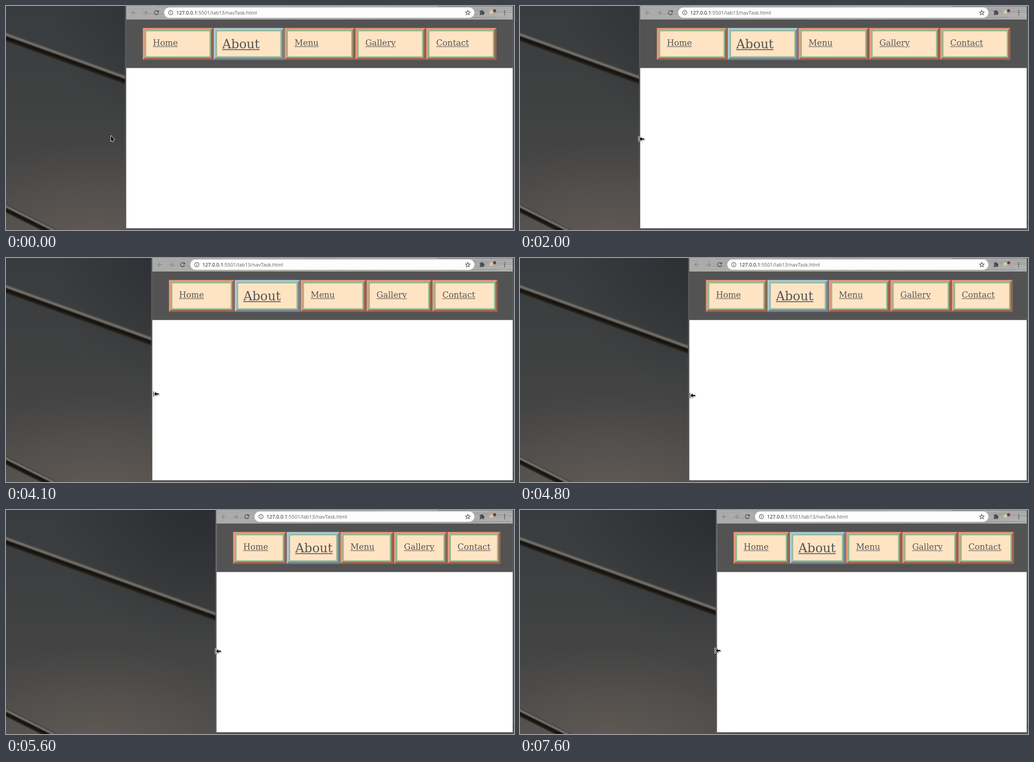
An HTML page with a canvas for the animation above (8000 ms loop, 1128x497 px).

```html
<!DOCTYPE html>
<html lang="en">
<head>
<meta charset="utf-8">
<title>Nav resize</title>
<style>
  html, body { margin: 0; width: 100%; height: 100%; overflow: hidden; background: #444; }
  canvas { display: block; width: 1128px; height: 497px; }
</style>
</head>
<body>
<canvas id="stage" width="1128" height="497"></canvas>
<script>
const W = 1128, H = 497, LOOP = 8000;
const ctx = document.getElementById('stage').getContext('2d');

const ITEMS = ['Home', 'About', 'Menu', 'Gallery', 'Contact'];
const INK = '#4b4b4b';

const linear = k => k;
const quad = k => k * k;
const smooth = k => k * k * (3 - 2 * k);

// Each move runs from the end of the one before; values are window edge, pointer x, pointer y
const START = [267, 232.5, 287.5];
const MOVES = [
  { at: 100, span: 900, tick: 100, to: [267, 265, 305], ease: linear },
  { at: 1400, span: 200, tick: 100, to: [267, 263, 295], ease: linear },
  { at: 2000, span: 500, tick: 100, to: [251.5, 246.3, 295], ease: linear },
  { at: 4100, span: 0, tick: 250, to: [325, 326.5, 301.5], ease: linear },
  { at: 4100, span: 750, tick: 250, to: [376, 376.3, 305], ease: linear },
  { at: 4850, span: 550, tick: 250, to: [467.5, 464.3, 313.3], ease: smooth },
  { at: 6650, span: 1000, tick: 250, to: [437.5, 432.3, 312], ease: quad }
];

const mix = (a, b, k) => a + (b - a) * k;

function stateAt(t) {
  // The picture only refreshes on a 100 ms grid
  const now = Math.floor(t / 100) * 100 + 50;
  const i = MOVES.findLastIndex(m => m.at <= now);
  if (i < 0) return START;
  const { at, span, tick, to, ease } = MOVES[i];
  const from = i ? MOVES[i - 1].to : START;
  const elapsed = Math.floor((now - at) / tick) * tick;
  const k = elapsed < span ? ease(elapsed / span) : 1;
  return from.map((v, j) => mix(v, to[j], k));
}

function rect(color, x, y, w, h) {
  ctx.fillStyle = color;
  ctx.fillRect(x, y, w, h);
}

function poly(points, color) {
  ctx.beginPath();
  points.forEach(([x, y]) => ctx.lineTo(x, y));
  ctx.closePath();
  if (color) {
    ctx.fillStyle = color;
    ctx.fill();
  }
}

function stroke(color, width) {
  ctx.strokeStyle = color;
  ctx.lineWidth = width;
  ctx.stroke();
}

function disc(x, y, r, color) {
  ctx.beginPath();
  ctx.arc(x, y, r, 0, Math.PI * 2);
  ctx.fillStyle = color;
  ctx.fill();
}

// Evenly spaced colours
function shade(gradient, colors) {
  colors.forEach((c, i) => gradient.addColorStop(i / (colors.length - 1), c));
  return gradient;
}

function glow(x, y, rx, ry, rgb, alpha) {
  ctx.save();
  ctx.translate(x, y);
  ctx.scale(rx, ry);
  const g = ctx.createRadialGradient(0, 0, 0, 0, 0, 1);
  rect(shade(g, [`rgba(${rgb},${alpha})`, `rgba(${rgb},0)`]), -1, -1, 2, 2);
  ctx.restore();
}

// A slanted metal edge: bright on top, dark shadow below
function rod(y, h, slope) {
  ctx.save();
  ctx.transform(1, slope, 0, 1, 0, 0);
  const g = ctx.createLinearGradient(0, y, 0, y + h);
  rect(shade(g, ['rgba(60,60,60,0)', '#484745', '#736f6a', '#6c6763', '#1f1b18',
    '#15110d', '#1d1914', '#2b2723', 'rgba(50,47,44,0)']), 0, y, W, h);
  ctx.restore();
}

function wallpaper() {
  const g = ctx.createLinearGradient(0, 0, 0, H);
  rect(shade(g, ['#393c3f', '#3d3f40', '#444444', '#4a4948']), 0, 0, W, H);
  glow(430, 0, 330, 300, '38,40,44', .75);
  glow(200, 540, 400, 240, '106,97,90', .75);
  rod(56, 24, .36);
  rod(438, 22, .5);
}

function arrowIcon(x, y, d) {
  ctx.beginPath();
  ctx.moveTo(x - 5 * d, y);
  ctx.lineTo(x + 5 * d, y);
  ctx.moveTo(x + .4 * d, y - 4.6);
  ctx.lineTo(x + 5 * d, y);
  ctx.lineTo(x + .4 * d, y + 4.6);
  stroke('#858585', 1.3);
}

function reloadIcon(x, y) {
  ctx.beginPath();
  ctx.arc(x, y, 4.5, .35, 5.4);
  stroke(INK, 1.5);
  poly([[x + 5.2, y - 5.4], [x + 5.2, y - .7], [x + .5, y - .7]], INK);
}

function infoIcon(x, y) {
  ctx.beginPath();
  ctx.arc(x, y, 4.8, 0, Math.PI * 2);
  stroke(INK, 1.1);
  rect(INK, x - .6, y - .7, 1.2, 3.2);
  rect(INK, x - .6, y - 2.9, 1.2, 1.3);
}

function starIcon(x, y) {
  poly(Array.from({ length: 10 }, (_, i) => {
    const a = i * Math.PI / 5, r = i % 2 ? 2.3 : 5.5;
    return [x + r * Math.sin(a), y - r * Math.cos(a)];
  }));
  stroke(INK, 1.1);
}

function puzzleIcon(x, y) {
  rect(INK, x - 4.8, y - 3.5, 9, 8.8);
  disc(x - .4, y - 3.9, 1.8, INK);
  disc(x + 4.2, y + .7, 1.8, INK);
  disc(x - 4.6, y + .9, 1.5, '#aaa');
  disc(x - .4, y + 5.3, 1.5, '#aaa');
}

function brushedMetal(L, R) {
  let seed = 7;
  const rand = () => (seed = seed * 16807 % 2147483647) / 2147483647;
  rect('#ababab', L, 0, R - L, 30);
  for (let i = 0; i < 100; i++) {
    const x = mix(L, R, rand()), len = Math.min(30 + rand() * 150, R - x);
    rect(rand() > .5 ? 'rgba(255,255,255,.12)' : 'rgba(0,0,0,.06)', x, Math.floor(rand() * 30), len, 1);
  }
  rect('#707070', R - 166, 0, 166, 1);
}

function toolbar(L, R) {
  const y = 14.7;
  brushedMetal(L, R);
  arrowIcon(L + 17, y, -1);
  arrowIcon(L + 42, y, 1);
  reloadIcon(L + 67.3, y);

  ctx.beginPath();
  ctx.roundRect(L + 84.3, 3.3, R - L - 169.3, 22.9, 11.45);
  ctx.fillStyle = '#fdfdfd';
  ctx.fill();
  infoIcon(L + 98.7, y);

  const host = '127.0.0.1', x = L + 111;
  ctx.font = '11px "Noto Sans", "Open Sans", sans-serif';
  ctx.fillStyle = '#28292b';
  ctx.fillText(host, x, 18.7);
  ctx.fillStyle = '#66686b';
  ctx.fillText(':5501/lab13/navTask.html', x + ctx.measureText(host).width, 18.7);

  starIcon(R - 99.6, 15);
  puzzleIcon(R - 68.3, y);
  // Profile picture
  disc(R - 47.5, 13.5, 4, '#d8c7a4');
  disc(R - 40, 10.5, 3.4, '#7d3b32');
  for (const dy of [-4.3, 0, 4.3]) disc(R - 17.8, y + dy, 1.25, INK);
}

function navBox(x, w, label) {
  const big = label === 'About';
  const y = 48.7, h = 70.5, edge = 4.6, line = 3, pad = edge + line;
  const r = x + w, bottom = y + h;
  rect(big ? '#b0c4de' : '#e9967a', x, y, w, h);
  poly([[r, y], [r, bottom], [x, bottom], [x + edge, bottom - edge], [r - edge, bottom - edge], [r - edge, y + edge]],
    big ? '#758394' : '#9b6451');
  rect('#8fbc8f', x + edge, y + edge, w - 2 * edge, h - 2 * edge);
  rect('#ffe4c4', x + pad, y + pad, w - 2 * pad, h - 2 * pad);

  const size = big ? 27.6 : 18.4, base = big ? 93.5 : 88;
  const tx = x + (big ? 19 : 22.4);
  ctx.font = `${size}px "DejaVu Serif", serif`;
  rect('#555', tx, base + size * .09, ctx.measureText(label).width, size * .065);
  // Break the underline around descenders
  ctx.strokeStyle = '#ffe4c4';
  ctx.lineWidth = 2.4;
  ctx.strokeText(label, tx, base);
  ctx.fillStyle = '#555';
  ctx.fillText(label, tx, base);
}

function browser(L) {
  // The right side drifts a little when the window is pulled left
  const R = 1125 + Math.min(0, L - 267) * .13;
  rect('#5b5b5b', L - 2.7, 0, R - L + 5.2, 495.7);
  rect('#fff', L, 0, R - L, 493);
  toolbar(L, R);
  rect('#535353', L, 30, R - L, 107.6);
  const gap = 1.5, pitch = ((R - L) * .953 - 33 + gap) / ITEMS.length;
  ITEMS.forEach((label, i) => navBox(L + 36.8 + i * pitch, pitch - gap, label));
}

function outlined(points) {
  poly(points);
  stroke('#fff', 2);
  poly(points, '#000');
}

function pointer(x, y, overEdge) {
  ctx.save();
  ctx.translate(x, y);
  ctx.lineJoin = 'round';
  ctx.shadowColor = 'rgba(0,0,0,.3)';
  ctx.shadowBlur = 2;
  ctx.shadowOffsetX = ctx.shadowOffsetY = 1;
  if (overEdge) {
    outlined([[.5, -5.5], [1.5, -5.5], [1.5, 5.5], [.5, 5.5]]);
    outlined([[2.4, 0], [6.8, -4.4], [6.8, -1.2], [12.4, -1.2], [12.4, 1.2], [6.8, 1.2], [6.8, 4.4]]);
  } else {
    outlined([[.6, .6], [.6, 12.4], [3.3, 10], [5.2, 14.2], [7, 13.4], [5.2, 9.3], [8.4, 9.2]]);
  }
  ctx.restore();
}

function draw() {
  const [edge, x, y] = stateAt(performance.now() % LOOP);
  wallpaper();
  browser(edge);
  pointer(x, y, x > edge - 6);
  requestAnimationFrame(draw);
}
draw();
</script>
</body>
</html>
```
